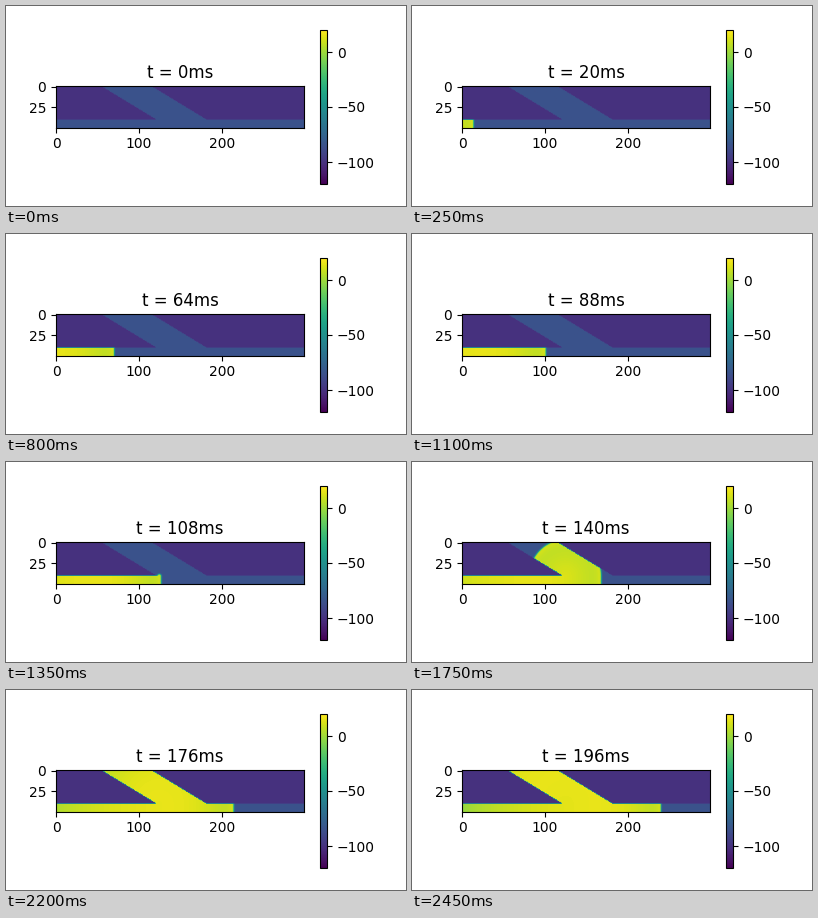
A matplotlib script that plays this animation: 400x200 px, repeating every 2.5 s.

```python
import numpy as np
import matplotlib.pyplot as plt
from matplotlib.animation import FuncAnimation

WIDTH, HEIGHT = 300, 50
FRAMES, INTERVAL = 50, 50
MS_PER_FRAME = 4
SPEED = 1.285          # cells per ms
START = 12.5           # head start the front lacks, in cells
CABLE_TOP, JUNCTION = 40, 124
OUTSIDE, REST = -100, -85

y, x = np.mgrid[:HEIGHT, :WIDTH].astype(float)
cable = y >= CABLE_TOP
offset = x - 5 / 3 * y
branch = (offset >= 55) & (offset <= 115)
tissue = cable | branch

# Straight front in the cable, round front in the branch
distance = np.where(cable, x, JUNCTION + np.hypot(x - JUNCTION, y - CABLE_TOP))
early_stimulus = 8 * np.exp(-distance / 4)
arrival = (START + distance) / SPEED - early_stimulus


def action_potential(age):
    """Fast upstroke with a spike, a notch, a dome and a slow decline."""
    a = np.maximum(age, 0)
    spike = 9 * np.exp(-a / 3)
    notch = 10 * np.exp(-(a / 32) ** 2)
    decline = 17 * (a / 186) ** 3
    active = 16 + spike - notch - decline
    upstroke = 1 / (1 + np.exp(-np.clip(age / 0.35, -50, 50)))
    return REST + (active - REST) * upstroke


def voltage(t):
    return np.where(tissue, action_potential(t - arrival), OUTSIDE)


fig, ax = plt.subplots(figsize=(4, 2), dpi=100)
image = ax.imshow(voltage(0), cmap="viridis", vmin=-120, vmax=20)
fig.colorbar(image)
title = ax.set_title("t = 0ms")


def update(frame):
    t = frame * MS_PER_FRAME
    image.set_data(voltage(t))
    title.set_text(f"t = {t}ms")
    return image, title


anim = FuncAnimation(fig, update, frames=FRAMES, interval=INTERVAL,
                     repeat=True, repeat_delay=0)
plt.show()
```
